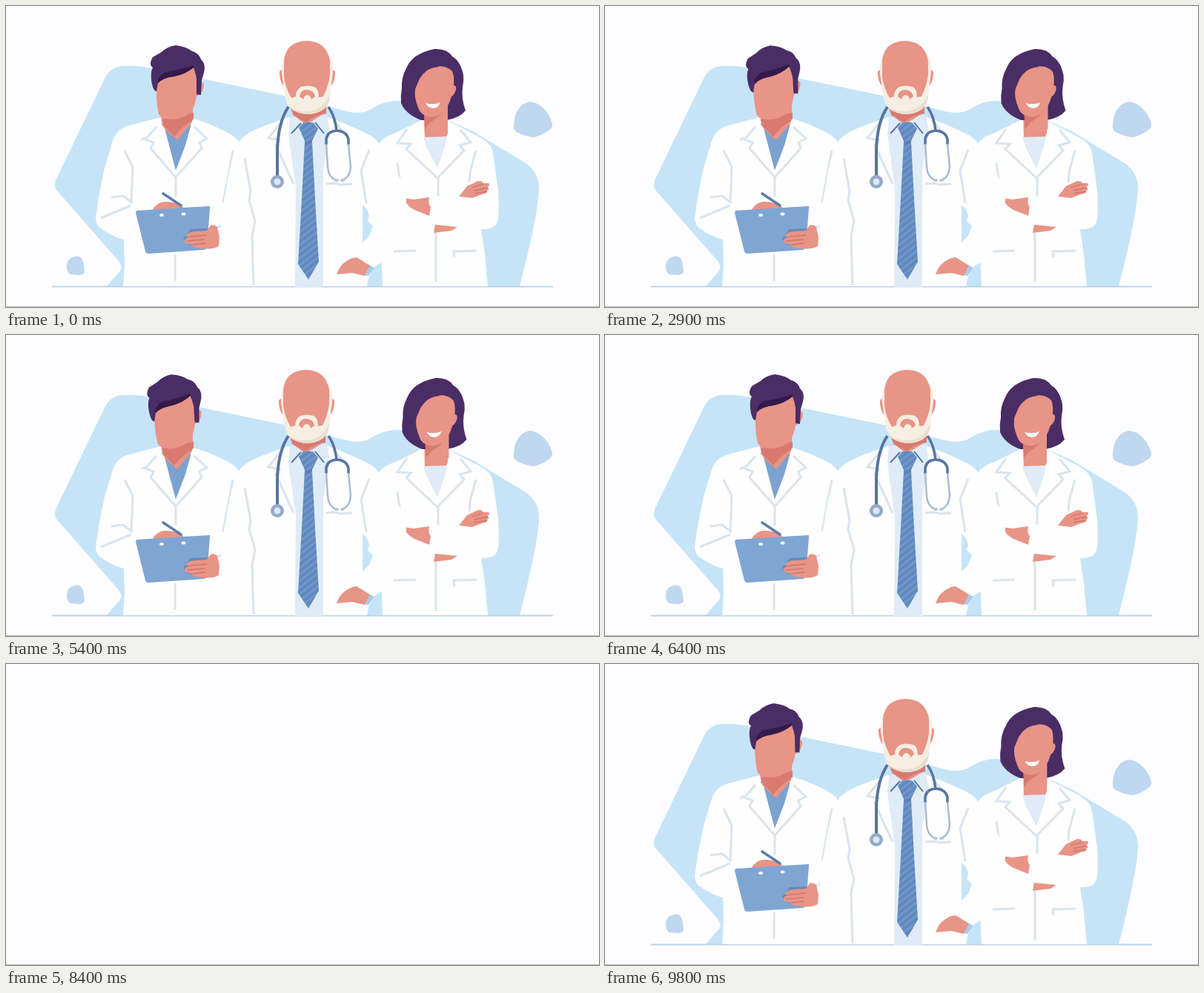
Write an HTML page that moves like this. It is 800 px wide and 406 px high and loops after 9.9 s.

```html
<!DOCTYPE html>
<html lang="en">
<head>
<meta charset="utf-8">
<title>Medical team</title>
<style>
html, body { margin: 0; width: 100%; height: 100%; overflow: hidden; background: #fdfdff; }
svg { display: block; width: 100vw; height: 100vh; }
.coat { fill: #fefefe; }
.seam { fill: none; stroke: #d9e4ed; stroke-width: 3; }
.skin { fill: #e89486; }
.shade { fill: #d97a70; }
.hair { fill: #4b2d66; }
.crease { fill: none; stroke: #d0766a; stroke-width: 1.3; }
.pale { fill: #dfebf6; }
.beard { fill: #f6eee2; }
.drop { fill: #bfd7f0; }
</style>
</head>
<body>
<svg viewBox="0 0 800 406">
<defs>
  <pattern id="stripes" width="7" height="7" patternUnits="userSpaceOnUse" patternTransform="rotate(-38)">
    <path fill="#6089bf" d="M0 0h7v7H0z"/>
    <path fill="#7398c8" d="M0 0h7v2.6H0z"/>
  </pattern>
</defs>

<path id="blob" d="M67 247Q65 241 67 235L133 98Q141 81 159 81Q180 80 205 86L380 122L455 141Q480 148 494 138Q512 127 530 128Q545 131 560 138L630 169L701 212Q720 225 719 249Q717 285 693 378H136L154 357Q158 352 152 344Z"/>
<path id="dropL" class="drop" d="M82 354Q81 345 86 341Q93 336 99 338Q104 340 105 350L106 359Q104 363 98 363L87 362Q83 360 82 354Z"/>
<path id="dropR" class="drop" d="M685 160Q686 147 690 141Q697 130 707 129Q717 130 725 138Q734 147 737 159Q738 164 732 168Q720 176 712 177Q700 176 689 170Q684 167 685 160Z"/>
<path id="ground" stroke="#bed3e8" stroke-width="2" d="M62 378.5H738"/>

<g id="man">
  <path class="coat" d="M205 151L163 162Q148 168 144 182L133 218L125 258L121 286Q121 297 131 302Q144 311 159 315L160 348L158 378H301L306 345L318 325V190Q315 181 303 173Q280 160 250 151Z"/>
  <path fill="#7ca2d0" d="M204 161L212 158L250 160L245 184L229 222Z"/>
  <path class="skin" d="M208 145L252 130V156L231 181L212 164Z"/>
  <path class="shade" d="M210 153L253 144V154Q240 160 227 176L213 162Z"/>
  <path fill="#fefefe" d="M204 152L214 165L229 222L197 186ZM252 152L242 188L229 222L264 184Z"/>
  <g id="manHead">
    <path class="skin" d="M203 98Q220 75 258 84L259 104Q266 100 267 107Q266 118 257 122Q255 137 247 145Q237 153 222 153Q211 152 206 146Q202 130 203 98Z"/>
    <path class="hair" d="M196 99Q195 88 198 83Q192 79 198 69L210 62Q217 55 229 53Q244 55 251 61Q260 63 263 72Q270 78 267 90L264 100L263 120L257 119V98Q256 91 253 83Q242 92 227 95Q211 97 205 104L203 115Q198 115 196 99Z"/>
    <path fill="#34194b" d="M205 104Q204 94 215 89Q235 86 253 80L253 83Q242 92 227 95Q211 97 205 104Z"/>
  </g>
  <path class="seam" d="M203 163L188 180L199 184L195 192L229 231L264 192L261 184L271 179L254 163M229 231V257M160 195L171 217L169 266M142 258L158 256L171 266M128 286L169 269M306 195L295 254L293 265M291 296L281 301M228 335V371M187 178L182 181"/>
  <path class="skin" d="M198 275Q203 265 214 264Q227 263 239 271L238 277H198Z"/>
  <path fill="none" stroke="#5c7dab" stroke-width="3.5" stroke-linecap="round" d="M212 253L236 269"/>
  <path fill="#7fa5d3" d="M176 276L274 270Q276 270 275 273L271 325Q270 329 266 329L192 334Q189 334 188 331L175 279Z"/>
  <g fill="#f4f8fc"><ellipse cx="210" cy="282" rx="3" ry="2"/><ellipse cx="239.500" cy="280.500" rx="3" ry="2"/></g>
  <path fill="#638bbd" d="M239 314L249 301L272 300L270 326L246 322Z"/>
  <path class="skin" d="M242 311Q245 304 256 304L271 303L276 296Q281 294 285 298L288 312L287 324Q278 329 266 327Q252 327 251 322Q242 321 241 317Q240 313 250 311Z"/>
  <path class="crease" d="M249 311L271 309M244 317L268 315M252 322L269 320"/>
</g>

<g id="woman">
  <path class="coat" d="M562 153L526 171Q507 177 503 187L505 300L508 378H650L646 335L641 301Q659 302 663 291Q666 278 664 248L657 198Q655 186 641 178L597 155Z"/>
  <path class="skin" d="M564 138H596V172L592 180L565 181Z"/>
  <path class="pale" d="M563 177L595 176L592 190L582 219L568 192Z"/>
  <g id="womanHead">
    <path class="hair" d="M578 58Q595 57 602 68Q613 74 617 93Q618 101 616 109Q614 125 620 141Q612 151 594 154L560 154Q539 146 533 131Q532 121 534 111Q533 97 540 84Q548 64 578 58Z"/>
    <path class="skin" d="M564 136L596 134V166L565 176Z"/>
    <path class="shade" d="M564 141L592 139Q584 151 572 157L565 166Z"/>
    <path class="skin" d="M558 98Q567 84 579 82Q593 79 602 88Q605 94 604 107Q608 107 607 113Q605 120 601 122Q596 139 587 145Q578 151 570 149Q559 147 556 137Q550 122 552 112Z"/>
    <path class="hair" d="M551 122Q551 104 561 92Q570 83 584 82Q572 76 556 88Q545 98 546 121Z"/>
    <path fill="#fff" d="M566 131Q576 134 586 130Q583 138 576 138Q569 137 566 131Z"/>
  </g>
  <path class="seam" d="M541 166L528 185L546 186L540 193L582 232L618 195L612 188L627 184L613 167M583 231V256M528 212L532 240M634 195L626 224L625 238M580 306V372M523 331L553 330M605 339L604 331L635 330M552 152L545 162"/>
  <path class="skin" d="M536 259L550 261L571 258Q569 267 573 271L571 283L551 275Q541 270 536 259Z"/>
  <path class="skin" d="M611 257L622 243L637 236Q644 236 643 239L651 239Q654 242 649 244Q654 247 649 249Q651 253 642 254L629 259Z"/>
  <path class="crease" d="M628 245L644 240M632 249L650 245M632 253L649 250"/>
  <path class="skin" d="M579 295L609 298L601 303L577 306Z"/>
</g>

<g id="chief">
  <path class="coat" fill-rule="evenodd" d="M381 150L345 163Q320 173 314 184Q303 207 298 240L290 288L289 378H487L490 364L498 351L508 345L538 277Q542 263 538 242L512 202Q508 187 494 176Q472 164 435 150ZM481 268L487 274L490 283L488 290L495 297L490 310L481 319Z"/>
  <path class="pale" d="M383 149L400 153L433 147L437 170L428 220L428 380H390L391 245L381 172Z"/>
  <path fill="#fefefe" d="M381 150L378 168L391 244L370 182ZM434 148L438 166L428 240L448 184Z"/>
  <path class="seam" d="M371 157L354 178L369 181L364 188L388 240M441 154L456 171M432 240Q446 238 451 241L467 240M322 206L330 250L328 262L336 290L332 310L334 377M490 194L479 222L486 266"/>
  <path class="skin" d="M446 362Q450 350 458 345Q466 339 473 339L491 350L492 355L484 364L467 360Z"/>
  <path fill="#a9cbea" d="M491 350L497 353L489 364L484 363Z"/>
  <g id="chiefHead">
    <path class="skin" d="M382 130L432 128V143L418 152L405 160L387 147Z"/>
    <path class="shade" d="M384 138L432 136V145Q416 147 405 157L388 147Z"/>
    <path class="skin" d="M374 86Q368 85 369 92Q370 104 375 108ZM438 86Q445 85 444 92Q443 104 438 108Z"/>
    <path class="beard" d="M376 66Q371 78 372 91L377 125Q380 139 396 144Q412 149 426 141Q436 135 437 121L441 90Q442 75 436 65Z"/>
    <path fill="#e9dfd0" d="M381 135Q391 143 408 142Q428 140 437 119Q437 135 426 141Q411 149 395 144Q385 141 381 135Z"/>
    <path class="skin" d="M375 75Q377 48 405 47Q432 47 437 74L437 93Q435 108 428 122L422 123Q422 112 416 109Q407 106 398 109Q391 113 391 122L385 124Q377 110 375 96Z"/>
    <path class="skin" d="M396 122Q397 113 406 113Q416 114 417 122L412 126Q411 120 406 120Q402 121 401 126Z"/>
  </g>
  <path fill="none" stroke="#5576a5" stroke-width="2" d="M385 172L398 158M417 157L429 172"/>
  <path fill="url(#stripes)" d="M395 164L401 157H414L421 165L413 182L417 260L422 345L408 369L394 348L399 260L403 182Z"/>
  <path fill="#4f75a9" opacity=".4" d="M403 182H413L411 186H403Z"/>
  <g fill="none" stroke="#57759f" stroke-width="4">
    <path d="M381 136Q367 157 366 195V229"/>
    <path d="M435 136Q444 149 446 168M432 187V179Q434 169 446 168Q460 169 462 180V187" stroke-width="3.500"/>
    <path stroke="#a8bacf" stroke-width="2.500" d="M432 186L434 217Q435 231 445 235M462 186L465 217Q464 231 454 235"/>
  </g>
  <circle cx="366" cy="237" r="9" fill="#93abc8"/>
  <circle cx="366" cy="237" r="4.500" fill="#dce8f3"/>
  <g fill="#b9c8d8"><ellipse cx="446" cy="235" rx="3" ry="2"/><ellipse cx="454" cy="235" rx="3" ry="2"/></g>
</g>
<path stroke="#b8b8b8" d="M0 405.500H800"/>
</svg>
<script>
const LOOP = 9900;
const el = id => document.getElementById(id);

// Each step is [time, scale].
const pops = {
  man: [[7500, 1], [7900, 1.08], [8250, 0], [8650, 0], [9120, 1.08], [9400, 1]],
  chief: [[7450, 1], [7900, 1.088], [8250, 0], [8450, 0], [8900, 1.088], [9350, 1]],
  woman: [[7820, 1], [8050, 1.08], [8350, 0], [8550, 0], [8985, 1.08], [9350, 1]],
  ground: [[8000, 1], [8130, 1.074], [8350, 0], [8400, 0], [8740, 1.074], [9100, 1]],
  blob: [[8000, 1], [8130, 1.045], [8350, 0], [8400, 0], [8740, 1.045], [9100, 1]],
  dropL: [[8000, 1], [8250, 0], [8690, 0], [9080, 1.08], [9350, 1]],
  dropR: [[8000, 1], [8250, 0], [8400, 0], [8750, 1.06], [8900, 1]]
};
const pivots = {
  man: [228, 378], chief: [418, 378], woman: [585, 378],
  ground: [400, 378.5], blob: [392, 378], dropL: [94, 351], dropR: [711, 154]
};

function at(steps, t) {
  if (t <= steps[0][0]) return steps[0][1];
  for (let i = 1; i < steps.length; i++) {
    const [a, from] = steps[i - 1], [b, to] = steps[i];
    if (t < b) return from + (to - from) * (1 - Math.cos(Math.PI * (t - a) / (b - a))) / 2;
  }
  return steps[steps.length - 1][1];
}

const wave = t => t < 785 || t > 7535 ? 0 : Math.cos(2 * Math.PI * (t - 410) / 1500);

function tilt(t) {
  if (t < 410) return 1;
  if (t < 785) return Math.cos(2 * Math.PI * (t - 410) / 1500);
  return t > 9400 ? ((t - 9400) / 500) ** 2 : wave(t);
}

function draw(t) {
  for (const id in pops) {
    const [x, y] = pivots[id];
    el(id).setAttribute("transform", `translate(${x} ${y}) scale(${at(pops[id], t)}) translate(${-x} ${-y})`);
  }
  const lean = tilt(t) - 1;
  el("manHead").setAttribute("transform", `rotate(${lean * 2.1} 230 165)`);
  el("womanHead").setAttribute("transform", `translate(${-lean})`);
  el("chiefHead").setAttribute("transform", `translate(${2 * wave(t)})`);
  el("blob").setAttribute("fill", t >= 7700 && t < 8300 ? "#c0d8f0" : "#c6e4f8");
}

const start = performance.now();
function tick() {
  draw((performance.now() - start) % LOOP);
  requestAnimationFrame(tick);
}
tick();
</script>
</body>
</html>
```
